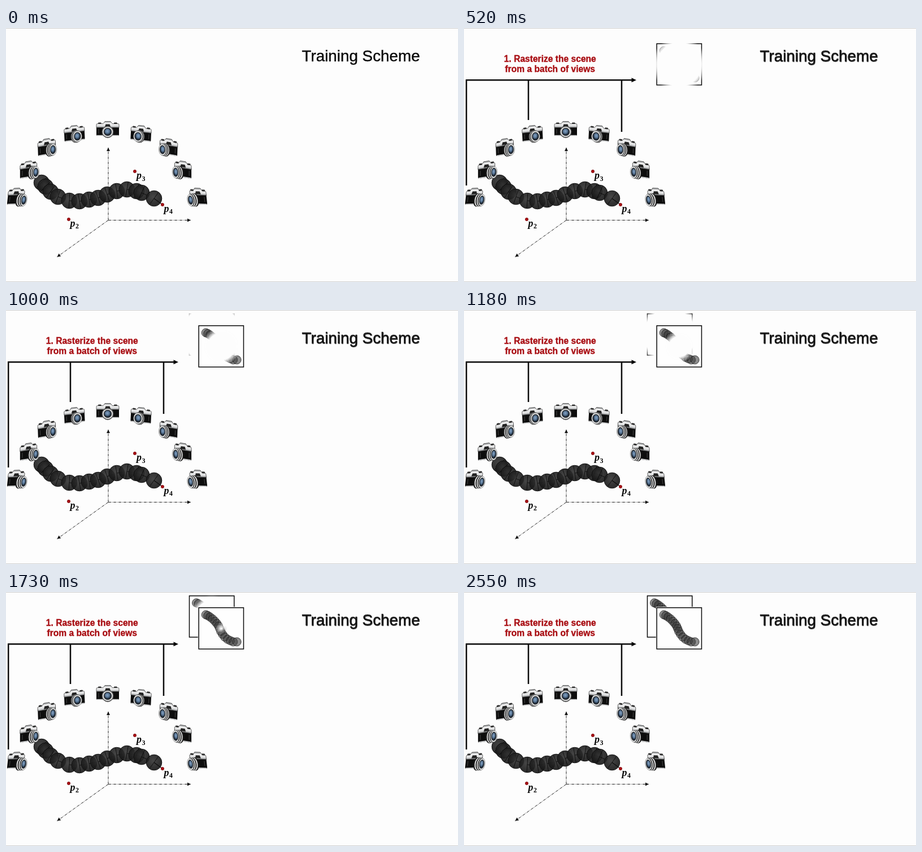
An HTML page for the animation above (2.91 s loop, 800x450 px).

```html
<!DOCTYPE html>
<html lang="en">
<head>
<meta charset="utf-8">
<title>Training Scheme</title>
<style>
  html, body { margin: 0; width: 100%; height: 100%; overflow: hidden; background: #fdfdfd; }
  svg { display: block; width: 100%; height: 100%; }
  text { font-family: "Liberation Sans", Arial, sans-serif; }
  #title { font-size: 27.8px; fill: #0a0a0a; stroke: #0a0a0a; stroke-width: .4px; }
  .step { font-weight: bold; font-size: 15.6px; fill: #a90f14; stroke: #a90f14; stroke-width: .35px; text-anchor: middle; }
  .var { font: italic bold 18px "Liberation Serif", "Noto Serif", serif; }
  .sub { font: bold 12px "Liberation Serif", "Noto Serif", serif; }
</style>
</head>
<body>
<svg viewBox="0 0 800 450" preserveAspectRatio="none">
  <defs>
    <linearGradient id="silver" x2="0" y2="1">
      <stop stop-color="#8d8f91"/><stop offset=".3" stop-color="#f4f4f4"/>
      <stop offset=".75" stop-color="#dcddde"/><stop offset="1" stop-color="#7c7e80"/>
    </linearGradient>
    <radialGradient id="glass" cx=".45" cy=".4">
      <stop stop-color="#86a3c4"/><stop offset=".65" stop-color="#53708f"/><stop offset="1" stop-color="#1f2c3c"/>
    </radialGradient>
    <radialGradient id="ball" cx=".45" cy=".4">
      <stop stop-color="#333"/><stop offset="1" stop-color="#171717"/>
    </radialGradient>
  </defs>
  <rect width="800" height="450" fill="#fdfdfd"/>
  <path d="M0 .5H800M0 449.5H800" stroke="#cfcfcf"/>
  <text id="title" x="523.5" y="59">Training Scheme</text>
  <g id="axes" stroke="#222" fill="#111"></g>
  <g id="worm"></g>
  <g id="points"></g>
  <g id="cameras"></g>
  <g id="views">
    <text class="step" x="152.3" y="59.5">1. Rasterize the scene</text>
    <text class="step" x="152.3" y="78">from a batch of views</text>
    <path d="M3 92.3H298M4.2 92V279M114 92V163M279 92V184" fill="none" stroke="#0a0a0a" stroke-width="2.5"/>
    <path d="M296.5 88.3L305 92.3L296.5 96.3Z" fill="#0a0a0a"/>
    <g id="cards"></g>
  </g>
</svg>
<script>
const LOOP = 2910, SHOW_AT = 30;
const NS = "http://www.w3.org/2000/svg";
const $ = id => document.getElementById(id);

function add(parent, tag, attrs = {}, text) {
  const el = document.createElementNS(NS, tag);
  for (const key in attrs) el.setAttribute(key, attrs[key]);
  if (text) el.textContent = text;
  return parent.appendChild(el);
}

function axis(x, y) {
  const angle = Math.atan2(y - 340.5, x - 181) * 180 / Math.PI;
  add($("axes"), "path", { d: `M181 340.5L${x} ${y}`, "stroke-dasharray": "5 1.5 1 1.5" });
  add($("axes"), "path", {
    d: "M0 0L-6 -3V3Z", stroke: "none",
    transform: `translate(${x} ${y}) rotate(${angle})`
  });
}

function drawWorm() {
  const worm = $("worm");
  const spine = [[63, 274], [70, 281], [79, 290], [92, 299], [112, 306], [130, 307], [147, 304],
    [163, 301], [179, 295], [196, 289], [214, 286], [231, 289], [240, 292], [262, 302]];
  spine.forEach(([x, y], i) => {
    const [nx, ny] = spine[i + 1] || [277, 313];
    const len = Math.hypot(nx - x, ny - y), ux = (nx - x) / len * 13, uy = (ny - y) / len * 13;
    add(worm, "circle", { cx: x, cy: y, r: 13.8, fill: "url(#ball)", "fill-opacity": 0.9, stroke: "#080808" });
    add(worm, "circle", { cx: x, cy: y, r: 13, fill: "none", stroke: "#555", "stroke-width": 0.5, "stroke-dasharray": "1 2" });
    add(worm, "path", {
      d: `M${x} ${y}l${ux} ${uy}M${x - uy} ${y + ux}L${x + uy} ${y - ux}`,
      stroke: "#060606", "stroke-width": 0.8
    });
  });
  add(worm, "path", { d: "M262 302L277 313", stroke: "#111", "stroke-width": 1.2 });
}

function point(x, y, n, tx, ty) {
  const g = $("points");
  add(g, "circle", { cx: x, cy: y, r: 2.7, fill: "#a90f14", stroke: "#6c090c", "stroke-width": 0.6 });
  add(g, "text", { class: "var", x: tx, y: ty, fill: "#0a0a0a" }, "p");
  add(g, "text", { class: "sub", x: tx + 9.5, y: ty + 3.5, fill: "#0a0a0a" }, n);
}

// yaw: 0 faces the viewer, 1 is nearly side on; flip mirrors the body.
function camera(x, y, yaw, tilt, flip = 1) {
  const g = add($("cameras"), "g", {
    transform: `translate(${x} ${y}) scale(${flip} ${1 + 0.12 * yaw}) rotate(${tilt}) skewX(${-9 * yaw})`
  });
  const w = 20 - 3 * yaw, left = -w, right = w - 5 * yaw;
  const width = right - left, mid = (left + right) / 2;
  add(g, "rect", { x: left, y: -7, width, height: 18, rx: 2, fill: "#0d0d0d" });
  add(g, "path", {
    d: `M${left} -3.5V-8.5q0 -2 2 -2H${mid - 8}l3 -4H${mid + 5}l3 4H${right - 2}q2 0 2 2V-3.5Z`,
    fill: "url(#silver)", stroke: "#333", "stroke-width": 0.7
  });
  add(g, "path", { d: `M${mid - 5} -5l1.5 -4.5H${mid + 3.5}l1.5 4.5Z`, fill: "#222" });
  for (const at of [0.14, 0.84])
    add(g, "rect", { x: left + width * at - 2.5, y: -12.5, width: 5.5, height: 2.6, rx: 0.8, fill: "#2d2d2d" });
  add(g, "path", { d: `M${left + 1} 10.5H${right - 1}`, stroke: "#d4d5d6", "stroke-width": 1.6 });
  add(g, "path", { d: `M${left + 4} -1v8`, stroke: "#3c3c3c", "stroke-width": 1.2 });

  const rings = [[0.3, 10.4, "#0d0d0d"], [0.45, 10.2, "#f0f0f0"], [0.62, 9.8, "#111"],
    [0.75, 9.8, "#f4f4f4"], [0.9, 9.4, "#17191b"], [1, 9.3, "#eceded"], [1, 7, "#1c2229"], [1, 5.9, "url(#glass)"]];
  for (const [depth, r, fill] of rings)
    add(g, "ellipse", {
      cx: 12 * yaw * depth, cy: 4 + 0.8 * yaw * depth,
      rx: r * (1 - 0.38 * yaw), ry: r, fill, stroke: "#333", "stroke-width": 0.4
    });
}

// A framed picture uncovered from its rim inwards by a soft circle.
function card(id, x, y, start) {
  const area = { x: x - 5, y: y - 5, width: 92, height: 86 };
  const mask = add($("cards"), "mask", { id, maskUnits: "userSpaceOnUse", ...area });
  const fade = add($("cards"), "radialGradient", {
    id: id + "Fade", gradientUnits: "userSpaceOnUse", cx: x + 39.8, cy: y + 36.8
  });
  const inner = add(fade, "stop", { "stop-color": "#000" });
  add(fade, "stop", { offset: 1, "stop-color": "#fff" });
  add(mask, "rect", { ...area, fill: `url(#${id}Fade)` });

  const g = add(add($("cards"), "g", { mask: `url(#${id})` }), "g", { transform: `translate(${x} ${y})` });
  add(g, "rect", { x: -1.5, y: -1.5, width: 82.5, height: 76.5, fill: "#fefefe" });
  add(g, "rect", { width: 79.3, height: 73.2, fill: "#fefefe", stroke: "#0a0a0a", "stroke-width": 1.5 });
  const spine = [[12.5, 12.5], [16, 14], [20, 16.5], [24.5, 20], [28.5, 24], [32, 28], [35, 32.5], [37, 37],
    [39, 42], [42, 47], [46, 52], [51, 56], [56, 58.5], [61, 60.5], [67.5, 60.5]];
  for (const [cx, cy] of spine)
    add(g, "circle", { cx, cy, r: 7.5, fill: "#333", "fill-opacity": 0.55, stroke: "#151515", "stroke-width": 0.7 });
  add(g, "circle", { cx: 67.5, cy: 60.5, r: 6, fill: "none", stroke: "#777", "stroke-width": 0.5 });

  return t => {
    const r = 60.5 - 0.0318 * (t - start), outer = Math.max(0.01, r + 5);
    fade.setAttribute("r", outer);
    inner.setAttribute("offset", Math.max(0, r - 5) / outer);
    g.style.display = r < 59 ? "" : "none";
  };
}

axis(181, 212);
axis(327, 340.5);
axis(90.5, 405.5);
drawWorm();
point(228, 254, "3", 231, 267);
point(277, 313, "4", 279.5, 325.5);
point(111, 339, "2", 113.5, 351.5);

// Left half of the arc, each camera paired with its mirrored partner.
for (const [x, mirrorX, y, yaw, tilt] of [
  [20, 338, 300, 1, -2], [42, 311, 252, 0.9, -8], [74, 286, 212, 0.75, -9], [122, 238, 188, 0.35, -6]
]) {
  camera(x, y, yaw, tilt);
  camera(mirrorX, y, yaw, tilt, -1);
}
camera(180, 180, 0, 0);

const cards = [card("back", 324.5, 6.8, 870), card("front", 341.2, 27.8, 0)];

function draw(t) {
  const shown = t >= SHOW_AT;
  $("views").style.display = shown ? "" : "none";
  $("title").style.textShadow = shown ? "0.6px 0.6px 0.6px #555" : "none";
  for (const update of cards) update(t);
}

const began = performance.now();
function tick() {
  draw((performance.now() - began) % LOOP);
  requestAnimationFrame(tick);
}
draw(0);
requestAnimationFrame(tick);
</script>
</body>
</html>
```
